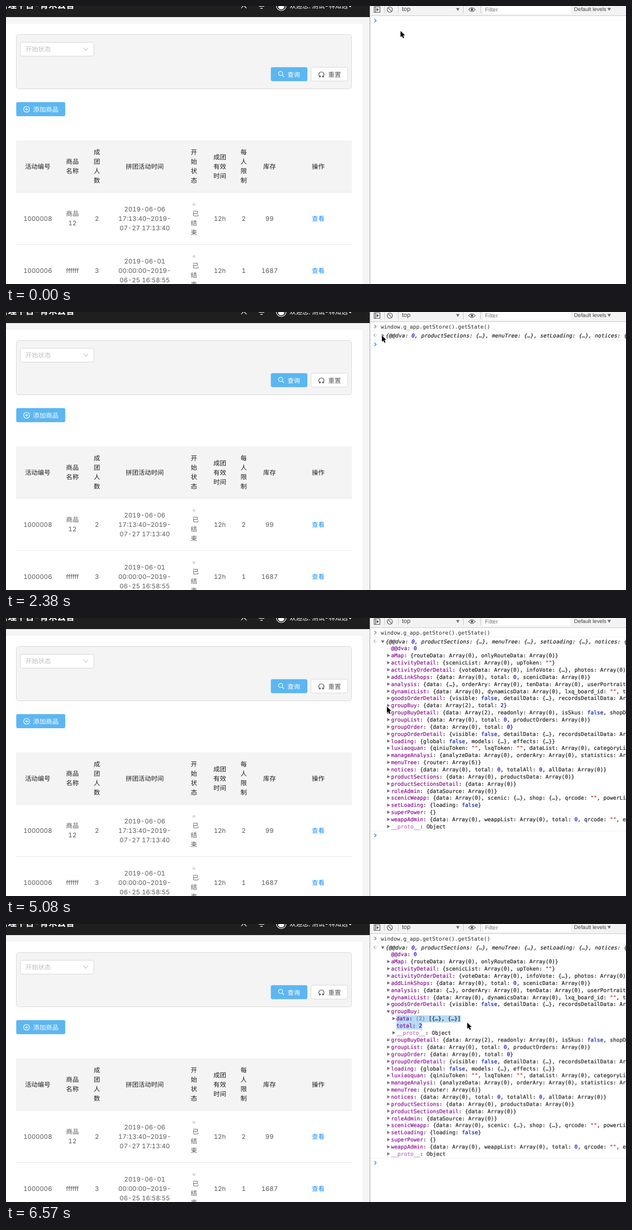
Write an HTML page that moves like this. It is 1115x502 px and loops after 8 s.

```html
<!DOCTYPE html>
<html lang="zh-CN">
<head>
<meta charset="utf-8">
<title>Console state demo</title>
<style>
  html, body { margin: 0; width: 100%; height: 100%; overflow: hidden; background: #fff; }
  svg { display: block; width: 100vw; height: 100vh; }
  text { white-space: pre; text-rendering: geometricPrecision; }
  .page { font: 11.4px Inter, "Noto Sans CJK SC", "Noto Sans CJK", sans-serif; font-variant-numeric: tabular-nums; fill: #595959; }
  .mid { text-anchor: middle; }
  .head { font-weight: 500; fill: #1f1f1f; }
  .link { fill: #1890ff; }
  .white { fill: #fff; }
  .hint { fill: #bfbfbf; }
  .box { fill: #fff; stroke: #d9d9d9; }
  .blue { fill: #5cb6f1; }
  .line { fill: none; stroke-width: 1.1; }
  .bar { font: 10.4px "Liberation Sans", Arial, sans-serif; fill: #444; }
  .code { font: 9.62px "DejaVu Sans Mono", Menlo, monospace; color: #262626; }
  .code text, .code tspan { fill: currentColor; }
  .value, .value tspan { stroke: currentColor; stroke-width: .22; }
  .italic { font-style: italic; }
  .key { color: #881391; }
  .proto { color: #b871bd; }
  .num { color: #1c00cf; }
  .bool { color: #0d22aa; }
  .str { color: #c41a16; }
  .dim { color: #808080; }
  .tri { fill: #6e6e6e; }
  .chevron { fill: none; stroke-width: 1.4; }

  .anim { animation: 8s step-end infinite; }
  .typed { animation-name: typed; }
  .ran { animation-name: ran; }
  .ready { animation-name: ready; }
  .folded { animation-name: folded; }
  .tree { animation-name: tree; }
  .closed { animation-name: closed; }
  .open { animation-name: open; }
  .tail { animation-name: tail; }
  .caret-a { animation-name: caret-a; }
  .caret-b { animation-name: caret-b; }
  .sel-a { animation-name: sel-a; }
  .sel-b { animation-name: sel-b; }
  .sel-c { animation-name: sel-c; }
  .pointer { animation-name: pointer; }

  @keyframes typed { 0% { opacity: 0 } 3.75%, 100% { opacity: 1 } }
  @keyframes ran { 0% { opacity: 0 } 15%, 100% { opacity: 1 } }
  @keyframes ready { 0% { opacity: 1 } 15%, 100% { opacity: 0 } }
  @keyframes folded { 0% { opacity: 0 } 15% { opacity: 1 } 31.625%, 100% { opacity: 0 } }
  @keyframes tree { 0% { opacity: 0 } 31.625%, 100% { opacity: 1 } }
  @keyframes closed { 0% { opacity: 1 } 67.25%, 100% { opacity: 0 } }
  @keyframes open { 0% { opacity: 0 } 67.25%, 100% { opacity: 1 } }
  @keyframes tail { 0% { transform: none } 67.25%, 100% { transform: translateY(38.6px) } }
  @keyframes caret-a { 0% { opacity: 0 } 3.75% { opacity: 1 } 11.25%, 100% { opacity: 0 } }
  @keyframes caret-b {
    0% { opacity: 0 } 15% { opacity: 1 } 22.375% { opacity: 0 }
    28% { opacity: 1 } 29.75%, 100% { opacity: 0 }
  }
  @keyframes sel-a { 0% { opacity: 0 } 76.5%, 100% { opacity: 1 } }
  @keyframes sel-b { 0% { opacity: 0 } 78.375%, 100% { opacity: 1 } }
  @keyframes sel-c { 0% { opacity: 0 } 82.125%, 100% { opacity: 1 } }
  @keyframes pointer {
    0% { transform: translate(709.5px, 45px) }
    20.5% { transform: translate(727px, 41.5px) }
    22.375% { transform: translate(711px, 37px) }
    24.25% { transform: translate(693px, 39.5px) }
    26.125% { transform: translate(682px, 42px) }
    28% { transform: translate(676px, 42.5px) }
    56% { transform: translate(677px, 46px) }
    57.875% { transform: translate(690px, 111.5px) }
    59.75% { transform: translate(697px, 149.5px) }
    61.625% { transform: translate(689px, 159px) }
    63.5% { transform: translate(685px, 160px) }
    71% { transform: translate(685px, 162px) }
    72.875% { transform: translate(687px, 170px) }
    74.75% { transform: translate(683px, 171px) }
    76.5% { transform: translate(772px, 170px) }
    78.375% { transform: translate(826px, 172px) }
    80.25% { transform: translate(827px, 174px) }
    82.125%, 100% { transform: translate(829.5px, 178px) }
  }
</style>
</head>
<body>
<svg viewBox="0 0 1115 502" preserveAspectRatio="none">
  <rect width="1115" height="502" fill="#fff"/>

  <g class="page" id="page">
    <path fill="#f5f5f5" d="M0 19H654V502H641V32H0Z"/>
    <rect width="654" height="20" fill="#1f1f1f"/>
    <text class="white" x="123.5" y="4" text-anchor="end" font-size="15.7" font-weight="700">管理平台-青禾云舍</text>
    <g class="line" stroke="#fff">
      <path d="M423 4L427.5 -1L432.5 4M454.5 .5H464.5M457.5 3.5Q459.5 5.5 461.5 3.5"/>
      <circle cx="495" cy="-.5" r="8.8"/>
    </g>
    <path class="white" d="M489 1Q495 -2 501 1Q500 6 495 6Q490 6 489 1Z"/>
    <text class="white" x="510" y="3.8">欢迎您: 测试-林知远</text>
    <path class="white" d="M616 -1H622L619 2.5Z"/>

    <rect x="18.5" y="51.5" width="603" height="98" rx="5" fill="#f4f4f4" stroke="#d9d9d9"/>
    <rect class="box" x="26" y="65.5" width="132" height="25" rx="3"/>
    <text class="hint" x="35" y="82">开始状态</text>
    <path class="line" stroke="#bfbfbf" d="M139.5 75.5L143.5 80L147.5 75.5"/>
    <rect class="blue" x="476.3" y="110.4" width="65.7" height="25.4" rx="3"/>
    <g class="line" stroke="#fff">
      <circle cx="493.8" cy="121.8" r="3.7"/>
      <path d="M496.5 124.5L500 128"/>
    </g>
    <text class="white" x="506.2" y="127.7">查询</text>
    <rect class="box" x="548.5" y="110.5" width="66" height="25" rx="3"/>
    <path class="line" stroke="#444" d="M564.8 127.7A4.7 4.7 0 1 1 569.7 127.7M562.7 128H565.3V125.5M572 128H569.3V125.5"/>
    <text x="579.5" y="127.7">重置</text>

    <rect class="blue" x="18.4" y="173.6" width="88.2" height="25.4" rx="3"/>
    <g class="line" stroke="#fff">
      <circle cx="37" cy="186.5" r="5.3"/>
      <path d="M34.3 186.5H39.7M37 183.8V189.2"/>
    </g>
    <text class="white" x="48.8" y="191">添加商品</text>

    <rect x="18" y="242.5" width="604" height="94" fill="#f4f4f4"/>
    <path stroke="#e8e8e8" d="M18 336.5H622M18 430.5H622"/>
  </g>

  <g class="bar">
    <rect x="655" width="460" height="17.5" fill="#f3f3f3"/>
    <path stroke="#ccc" d="M655 17.5H1115M680.5 0V13M705.5 0V13M822.5 0V13M853.5 0V13"/>
    <path stroke="#a8a8a8" d="M654.5 0V502"/>
    <g class="line" stroke="#5a5a5a">
      <path d="M662 1.5H672.5V11.5H662ZM664.5 1.5V11.5"/>
      <circle cx="690.3" cy="6.5" r="4.7"/>
      <path d="M687 3.2L693.6 9.8M832 6.5Q838 -.5 844 6.5Q838 13.5 832 6.5Z"/>
    </g>
    <path fill="#5a5a5a" d="M666.5 3.5L670.8 6.5L666.5 9.5Z"/>
    <circle cx="838" cy="6.5" r="2.2" fill="#5a5a5a"/>
    <text x="712" y="9.4" font-size="11">top</text>
    <rect x="858" width="157" height="14" fill="#fff"/>
    <text x="861.5" y="10" fill="#757575">Filter</text>
    <text x="1021.5" y="9.3" font-size="9.7">Default levels</text>
    <path fill="#6e6e6e" d="M809.5 3.8H815.5L812.5 9ZM1081.5 3.5H1088L1084.7 8.7Z"/>
  </g>

  <g class="code" id="console">
    <path class="chevron anim ready" stroke="#3d85f0" d="M662.5 23.3L665.7 26.3L662.5 29.3"/>
    <text class="anim typed" x="674" y="29.8">window.g_app.getStore().getState()</text>
    <path class="anim caret-a" stroke="#000" d="M871.5 20V31"/>
    <g class="anim ran">
      <path class="chevron" stroke="#8a8a8a" d="M662.5 23.3L665.7 26.3L662.5 29.3"/>
      <path stroke="#f3f3f3" d="M655 34.5H1115"/>
      <path class="chevron" stroke="#b5b5b5" d="M664.5 39.3L661.7 42L664.5 44.7"/>
      <circle cx="666.5" cy="42" r=".8" fill="#b5b5b5"/>
    </g>
    <g class="anim folded">
      <path class="tri" d="M675.5 39.5V45.5L680.5 42.5Z"/>
      <path stroke="#f0f0f0" d="M655 50.5H1115"/>
      <path class="chevron" stroke="#3d85f0" d="M662.5 55.5L665.7 58.5L662.5 61.5"/>
    </g>
    <path class="anim caret-b" stroke="#000" d="M674.5 53V64"/>
    <g class="anim tree">
      <path class="tri" d="M674.5 40.5H680.5L677.5 45.5Z"/>
      <g fill="#b7daf9">
        <rect class="anim sel-a" x="702" y="165" width="34.8" height="12.8"/>
        <rect class="anim sel-b" x="736.7" y="165" width="81.5" height="12.8"/>
        <rect class="anim sel-c" x="702" y="177.8" width="46.4" height="12.8"/>
      </g>
      <g id="rows"></g>
      <g class="anim closed" id="closed"></g>
      <g class="anim open" id="open">
        <path class="tri" d="M684.5 156H690.5L687.5 161Z"/>
      </g>
      <g class="anim tail" id="tail">
        <path stroke="#f0f0f0" d="M655 384.5H1115"/>
        <path class="chevron" stroke="#3d85f0" d="M662.5 389.5L665.7 392.5L662.5 395.5"/>
      </g>
    </g>
  </g>

  <path class="anim pointer" d="M0 0V11.3L2.6 8.9L4.5 13.2L6.5 12.3L4.7 8.1H8Z" fill="#000" stroke="#fff" stroke-width="1.2" paint-order="stroke"/>
</svg>

<script>
  const $ = id => document.getElementById(id);

  function add(parent, tag, attrs, content = '') {
    const node = document.createElementNS('http://www.w3.org/2000/svg', tag);
    for (const name in attrs) node.setAttribute(name, attrs[name]);
    node.textContent = content;
    return parent.appendChild(node);
  }

  // Table cells: lines are stacked around the row centre
  function cell(x, y, content, style = '') {
    const lines = content.split('|');
    lines.forEach((line, i) => add($('page'), 'text', {
      class: 'mid ' + style, x, y: y + 4.2 + (i - (lines.length - 1) / 2) * 17
    }, line));
  }

  const columns = [57, 119.5, 163.5, 249.5, 338, 384.5, 427.5, 474, 561.5];
  ['活动编号', '商品|名称', '成|团|人|数', '拼团活动时间', '开|始|状|态',
    '成团|有效|时间', '每|人|限|制', '库存', '操作']
    .forEach((title, i) => cell(columns[i], 289.5, title, 'head'));

  [
    ['1000008', '商品|12', '2', '2019-06-06|17:13:40~2019-|07-27 17:13:40', '', '12h', '2', '99'],
    ['1000006', 'ffffff', '3', '2019-06-01|00:00:00~2019-|06-25 16:58:55', '', '12h', '1', '1687']
  ].forEach((record, r) => {
    const y = 383.3 + r * 94;
    record.forEach((value, i) => cell(columns[i], y, value));
    cell(columns[8], y, '查看', 'link');
    add($('page'), 'circle', { cx: 338, cy: y - 25, r: 2.5, fill: '#d9d9d9' });
    cell(341, y - 8.5, '已');
    cell(338, y + 17, '结|束');
  });

  // Console values, coloured by kind
  function paint(text, source) {
    for (const part of source.split(/(""|\bfalse\b|(?<=: )\d+|(?<=: )\(2\))/)) {
      const kind = part === '""' ? 'str' : part === 'false' ? 'bool'
        : /^\d+$/.test(part) ? 'num' : part === '(2)' ? 'dim' : '';
      add(text, 'tspan', { class: kind }, part);
    }
  }

  const rowY = i => 55 + i * 12.86;

  function row(parent, i, source, x = 692.5, arrow = true) {
    const y = rowY(i), end = source.indexOf(':');
    if (arrow) add(parent, 'path', { class: 'tri', d: `M${x - 7} ${y - 3}v6l5-3Z` });
    const text = add(parent, 'text', { class: 'value', x, y: y + 3.4 });
    const name = source.slice(0, end);
    add(text, 'tspan', { class: name === '__proto__' ? 'proto' : 'key' }, name);
    paint(text, source.slice(end));
  }

  const preview = add($('console'), 'text', { class: 'value italic anim ran', x: 683, y: 45.8 });
  paint(preview, '{@@dva: 0, productSections: {…}, menuTree: {…}, setLoading: {…}, notices: {…}, …}');

  const entries = `@@dva: 0
aMap: {routeData: Array(0), onlyRouteData: Array(0)}
activityDetail: {scenicList: Array(0), upToken: ""}
activityOrderDetail: {voteData: Array(0), infoVote: {…}, photos: Array(0)}
addLinkShops: {data: Array(0), total: 0, scenicData: Array(0)}
analysis: {data: {…}, orderAry: Array(0), tenData: Array(0), userPortrait: {…}}
dynamicList: {data: Array(0), dynamicsData: Array(0), lxq_board_id: "", total: 0}
goodsOrderDetail: {visible: false, detailData: {…}, recordsDetailData: Array(0)}
groupBuy: {data: Array(2), total: 2}
groupBuyDetail: {data: Array(2), readonly: Array(0), isSkus: false, shopData: {…}}
groupList: {data: Array(0), total: 0, productOrders: Array(0)}
groupOrder: {data: Array(0), total: 0}
groupOrderDetail: {visible: false, detailData: {…}, recordsDetailData: Array(0)}
loading: {global: false, models: {…}, effects: {…}}
luxiaoquan: {qiniuToken: "", lxqToken: "", dataList: Array(0), categoryList: {…}}
manageAnalysi: {analyzeData: Array(0), orderAry: Array(0), statistics: Array(0)}
menuTree: {router: Array(6)}
notices: {data: Array(0), total: 0, totalAll: 0, allData: Array(0)}
productSections: {data: Array(0), productsData: Array(0)}
productSectionsDetail: {data: Array(0)}
roleAdmin: {dataSource: Array(0)}
scenicWeapp: {data: Array(0), scenic: {…}, shop: {…}, qrcode: "", powerList: {…}}
setLoading: {loading: false}
superPower: {}
weappAdmin: {data: Array(0), weappList: Array(0), total: 0, qrcode: "", error: ""}
__proto__: Object`.split('\n');

  const group = 8;
  entries.forEach((entry, i) => {
    const parent = i < group ? $('rows') : i === group ? $('closed') : $('tail');
    row(parent, i, entry, 692.5, i > 0);
  });
  row($('open'), group, 'groupBuy:', 692.5, false);
  row($('open'), group + 1, 'data: (2) [{…}, {…}]', 702);
  row($('open'), group + 2, 'total: 2', 702, false);
  row($('open'), group + 3, '__proto__: Object', 702);
</script>
</body>
</html>
```
